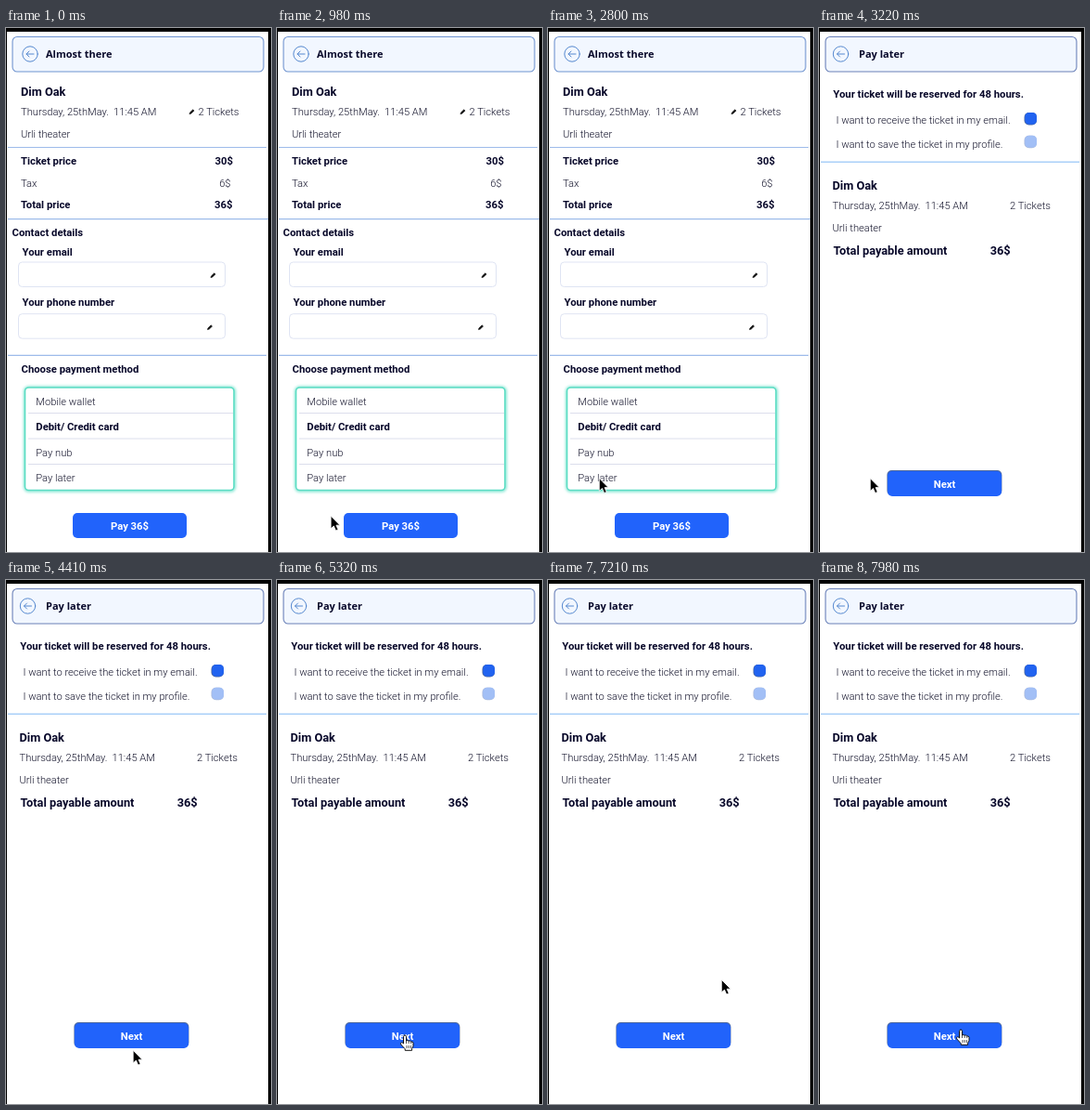
An HTML page that plays this animation: 286x564 px, repeating every 8 s.

```html
<!DOCTYPE html>
<html lang="en">
<head>
<meta charset="utf-8">
<title>Ticket checkout</title>
<style>
  html, body { margin: 0; width: 100%; height: 100%; overflow: hidden; background: #000; }
  svg { display: block; width: 286px; height: 564px; }
  text { font-family: Roboto, "Liberation Sans", sans-serif; white-space: pre; }
  .light { font-size: 11.15px; font-weight: 300; fill: #14142c; }
  .bold { font-size: 11.3px; font-weight: 600; fill: #08082a; }
  .large { font-size: 12.75px; font-weight: 600; fill: #08082a; }
  .head { font: 700 11px "Open Sans", "Noto Sans", sans-serif; fill: #08082a; }
  .label { font-size: 11.3px; font-weight: 600; fill: #fff; text-anchor: middle; }
  .end { text-anchor: end; }
  .rule { stroke: #9dbbea; stroke-width: 1.2; }
  .soft { stroke: #a9d0f8; stroke-width: 1.5; }
  .split { stroke: #dcdeec; }
  .field { fill: #fff; stroke: #dfe4f3; }
  .button { fill: #2163fb; }
  .edge { fill: #4a679f; }
  .back { fill: none; stroke: #5588cf; stroke-linecap: round; stroke-linejoin: round; }
</style>
</head>
<body>
<svg viewBox="0 0 286 564">
  <defs>
    <filter id="glow" x="-10%" y="-10%" width="120%" height="120%">
      <feGaussianBlur stdDeviation="1.5"/>
    </filter>
    <g id="pencil">
      <path d="M-2.6 2.7L-2.1 1L1.2 -2.2L2.6 -.9L-.8 2.2Z" fill="#111" stroke="#111" stroke-width=".5"/>
    </g>
    <g id="back" class="back">
      <circle r="8.2"/>
      <path d="M4 0H-4M-1 -3L-4 0L-1 3"/>
    </g>
  </defs>
  <rect x="1" y="4" width="282" height="560" fill="#fff"/>
  <g id="checkout"></g>
  <g id="later"></g>
  <circle id="ring" cx="47" cy="486" r="22" fill="none" stroke="#111" stroke-width="1.4"/>
  <g id="cursor">
    <path id="arrow" d="M0 0V13.6L3.2 10.8L5.4 15.8L7.9 14.7L5.8 9.9H9.8Z" fill="#000" stroke="#fff" stroke-width=".8"/>
    <g id="hand" fill="#fff" stroke="#111" stroke-linejoin="round">
      <path d="M-1.5 9V1.3Q-1.3 0 0 0T1.5 1.3V6Q3 4.9 4.2 6.2Q5.8 5.4 6.7 6.9Q8.7 6.5 9 8.3V11.3Q8.7 13 7.6 14.3V16.3H.2V14.8L-4.3 9.9Q-5 8.3 -3.6 7.8Q-2.5 7.8 -1.5 9Z"/>
      <path d="M1.5 6V9M4.2 6.4V9M6.7 7V9.2M2 11V14M4.2 11V14M6.4 11V14" stroke-width=".7"/>
    </g>
  </g>
</svg>
<script>
const $ = id => document.getElementById(id);
const text = (x, y, cls, str) => `<text x="${x}" y="${y}" class="${cls}">${str}</text>`;
const rect = (x, y, w, h, r, attrs) =>
  `<rect x="${x}" y="${y}" width="${w}" height="${h}" rx="${r}" ${attrs}/>`;
const line = (x1, x2, y, cls) => `<path d="M${x1} ${y}H${x2}" class="${cls}"/>`;
const icon = (id, x, y) => `<use href="#${id}" x="${x}" y="${y}"/>`;

const header = (title, x, border) =>
  rect(7, 9.5, 271, 37.5, 5, `fill="#f2f7ff" stroke="${border}" stroke-width="1.1"`) +
  icon('back', x, 28) + text(43, 32, 'head', title);

const button = (x, y, str) =>
  rect(x, y, 123, 27, 5, 'class="button"') + text(x + 61.5, y + 17.6, 'label', str);

const check = (y, color, edge) =>
  rect(221.5, y, 13.5, 13.5, 5, `fill="${edge}"`) +
  rect(222.3, y, 12.7, 12.7, 4.5, `fill="${color}"`);

const when = (x, y) =>
  text(x, y, 'light', 'Thursday, 25thMay.') + text(x + 100, y, 'light', '11:45 AM');

const show = 'Dim Oak', venue = 'Urli theater';
const options = ['Mobile wallet', 'Debit/ Credit card', 'Pay nub', 'Pay later'];

$('checkout').innerHTML = [
  header('Almost there', 26, '#6f93cf'),
  text(16, 72.5, 'large', show),
  when(16, 94),
  icon('pencil', 200.5, 90),
  text(207.5, 94, 'light', '2 Tickets'),
  text(16, 118, 'light', venue),
  line(2, 281, 128.5, 'rule'),
  text(16, 147, 'bold', 'Ticket price'),
  text(245, 147, 'bold end', '30$'),
  text(16, 170.5, 'light', 'Tax'),
  text(242.5, 170.5, 'light end', '6$'),
  text(16, 194, 'bold', 'Total price'),
  text(244.5, 194, 'bold end', '36$'),
  line(2, 283, 205.7, 'rule'),
  text(6.5, 224, 'bold', 'Contact details'),
  text(17.5, 244.5, 'bold', 'Your email'),
  rect(13.5, 252, 223, 26.5, 4, 'class="field"'),
  icon('pencil', 223.5, 266),
  text(17.5, 299, 'bold', 'Your phone number'),
  rect(13.5, 307.7, 223, 26.5, 4, 'class="field"'),
  icon('pencil', 220, 322),
  line(2, 281, 352.3, 'rule'),
  text(16.5, 371, 'bold', 'Choose payment method'),
  rect(20.5, 387, 226, 111, 4, 'fill="none" stroke="#7ee5d0" stroke-width="3" filter="url(#glow)"'),
  rect(20.5, 387, 225.5, 110.5, 4, 'fill="#fff" stroke="#5bdcc3" stroke-width="1.6"'),
  ...options.map((name, i) =>
    (i ? line(24, 245, 387 + 27.5 * i, 'split') : '') +
    text(32.3, 405.5 + 27.5 * i, i === 1 ? 'bold' : 'light', name)),
  button(72, 522, 'Pay 36$')
].join('');

$('later').innerHTML = [
  header('Pay later', 23.5, '#6a80b8'),
  text(15.3, 74.8, 'bold', 'Your ticket will be reserved for 48 hours.'),
  text(18.5, 102.6, 'light', 'I want to receive the ticket in my email.'),
  check(91, '#2163f0', '#4a679f'),
  text(18.5, 128.6, 'light', 'I want to save the ticket in my profile.'),
  check(115.8, '#a2bff6', '#a9b9dc'),
  line(2, 281, 144.3, 'soft'),
  text(14.5, 173.7, 'large', show),
  when(14.5, 194.8),
  text(206, 194.8, 'light', '2 Tickets'),
  text(14.5, 219.2, 'light', venue),
  text(15.5, 243.8, 'large', 'Total payable amount'),
  text(184.7, 243.8, 'large', '36$'),
  rect(73.4, 476, 124, 27, 5, 'class="edge"'),
  button(74, 477, 'Next')
].join('');

const LOOP = 8000, TICK = 70;
const SHOW = 770, PRESS = 1610, RELEASE = 1890, SWAP = 3080;

// start, end, x, y of the pointer tip after each move
const start = [62, 539];
const moves = [
  [700, 1540, 47, 486],
  [2100, 2450, 55.3, 484.7],
  [3780, 4410, 137.2, 506.3],
  [4690, 5110, 138, 490],
  [6020, 6300, 152, 442],
  [6440, 7280, 188, 430],
  [7280, 7840, 153, 484]
];
const clamp = v => Math.min(1, Math.max(0, v));
const ease = p => p * p * (3 - 2 * p);

function pointer(t) {
  let [x, y] = start;
  for (const [from, to, nx, ny] of moves) {
    const p = ease(clamp((t - from) / (to - from)));
    x += (nx - x) * p;
    y += (ny - y) * p;
  }
  return [x, y];
}

const visible = (id, on) => { $(id).style.display = on ? '' : 'none'; };

function draw(now) {
  const t = Math.floor(now % LOOP / TICK) * TICK;
  const [x, y] = pointer(t);
  const later = t >= SWAP;
  const over = later && x > 74 && x < 197 && y > 477 && y < 504;
  visible('checkout', !later);
  visible('later', later);
  visible('cursor', t >= SHOW);
  visible('arrow', !over);
  visible('hand', over);
  $('cursor').setAttribute('transform', `translate(${x} ${y})`);

  const grow = clamp((t - PRESS + TICK) / (3 * TICK));
  const fade = 1 - clamp((t - RELEASE + TICK) / (2 * TICK));
  $('ring').setAttribute('r', 12 + 10 * grow);
  $('ring').setAttribute('opacity', t < PRESS ? 0 : grow * fade);
}

const origin = performance.now();
function loop() {
  draw(performance.now() - origin);
  requestAnimationFrame(loop);
}
loop();
</script>
</body>
</html>
```
